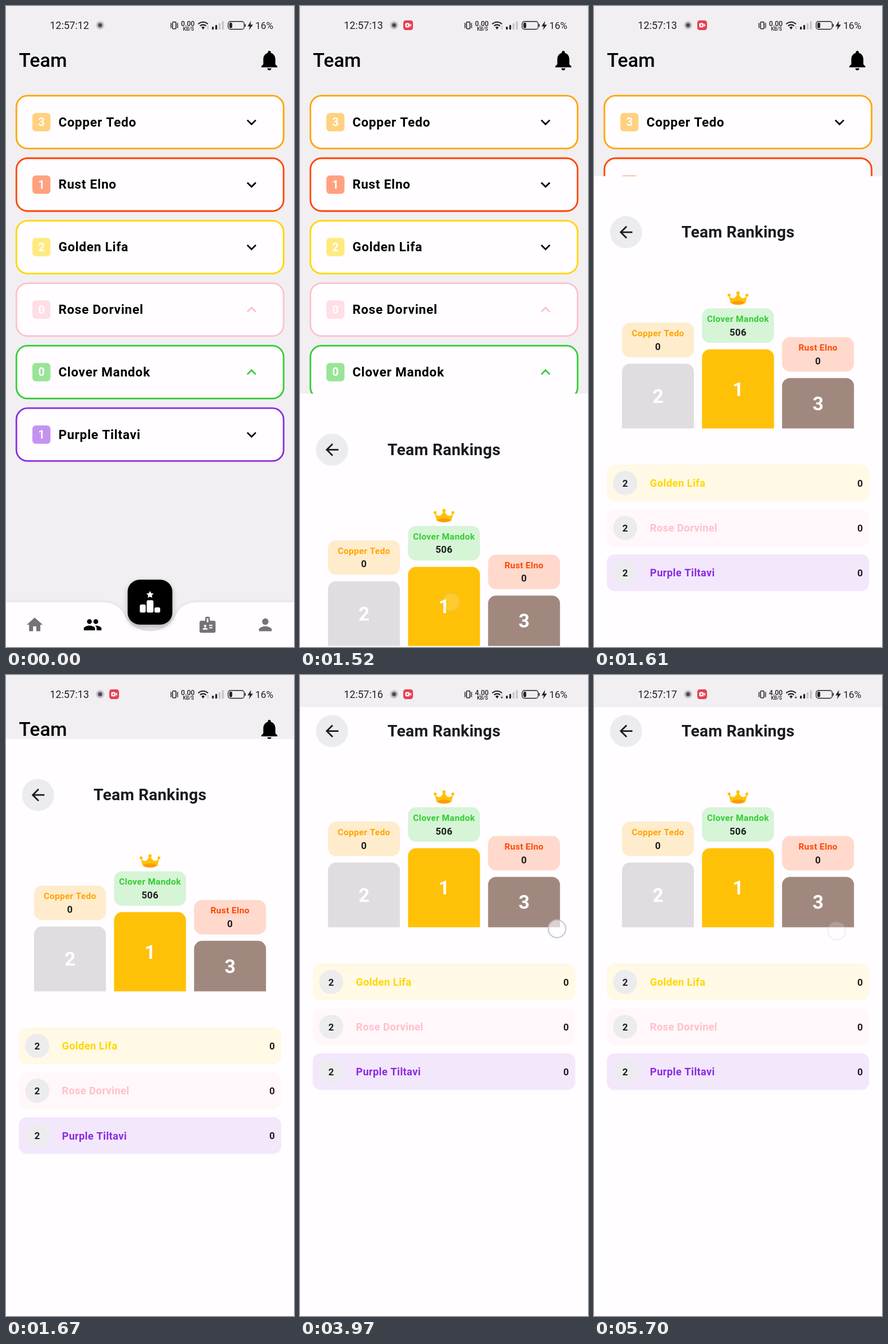
These frames come from a looping animation (502x1116 px, 5.73 s). An HTML page with a canvas:

```html
<!DOCTYPE html>
<html lang="en">
<head>
<meta charset="utf-8">
<title>Team rankings</title>
<style>
html, body { margin: 0; width: 100%; height: 100%; overflow: hidden; background: #f1eff2; }
canvas { display: block; width: 502px; height: 1116px; }
</style>
</head>
<body>
<canvas id="stage"></canvas>
<script>
const W = 502, H = 1116, LOOP = 5730, DP = 1.395;
const canvas = document.getElementById('stage');
const ctx = canvas.getContext('2d');
const ratio = window.devicePixelRatio || 1;
canvas.width = Math.round(W * ratio);
canvas.height = Math.round(H * ratio);

const BG = '#f1eff2', PAPER = '#fffdff', INK = '#1c1b1f', GREY = '#757377', DISC = '#ecebee';

const teams = [
  { name: 'Copper Tedo', rgb: '255,165,0', count: 3 },
  { name: 'Rust Elno', rgb: '255,69,0', count: 1 },
  { name: 'Golden Lifa', rgb: '255,215,0', count: 2 },
  { name: 'Rose Dorvinel', rgb: '255,192,203', count: 0, open: true },
  { name: 'Clover Mandok', rgb: '50,205,50', count: 0, open: true },
  { name: 'Purple Tiltavi', rgb: '138,43,226', count: 1 }
];
const podium = [
  { team: teams[0], x: 48.8, top: 255.3, place: 2, score: 0, fill: '#dfdde0' },
  { team: teams[4], x: 188.3, top: 230.3, place: 1, score: 506, fill: '#ffc107' },
  { team: teams[1], x: 327.8, top: 280.3, place: 3, score: 0, fill: '#a1887f' }
];
const taps = [
  { x: 263, y: 1038, at: 1300, fade: 290 },
  { x: 448, y: 442, at: 3970, fade: 450 },
  { x: 423, y: 446, at: 4640, fade: 450 },
  { x: 423, y: 446, at: 5240, fade: 650 }
];

const icons = {
  bell: 'M12 22c1.1 0 2-.9 2-2h-4c0 1.1.89 2 2 2zm6-6v-5c0-3.07-1.64-5.64-4.5-6.32V4c0-.83-.67-1.5-1.5-1.5s-1.5.67-1.5 1.5v.68C7.63 5.36 6 7.92 6 11v5l-2 2v1h16v-1l-2-2z',
  down: 'M16.59 8.59 12 13.17 7.41 8.59 6 10l6 6 6-6z',
  up: 'M12 8l-6 6 1.41 1.41L12 10.83l4.59 4.58L18 14z',
  back: 'M20 11H7.83l5.59-5.59L12 4l-8 8 8 8 1.41-1.41L7.83 13H20z',
  home: 'M10 20v-6h4v6h5v-8h3L12 3 2 12h3v8z',
  people: 'M16 11c1.66 0 2.99-1.34 2.99-3S17.66 5 16 5c-1.66 0-3 1.34-3 3s1.34 3 3 3zm-8 0c1.66 0 2.99-1.34 2.99-3S9.66 5 8 5C6.34 5 5 6.34 5 8s1.34 3 3 3zm0 2c-2.33 0-7 1.17-7 3.5V19h14v-2.5c0-2.33-4.67-3.5-7-3.5zm8 0c-.29 0-.62.02-.97.05 1.16.84 1.97 1.97 1.97 3.45V19h6v-2.5c0-2.33-4.67-3.5-7-3.5z',
  card: 'M20 7h-5V4c0-1.1-.9-2-2-2h-2c-1.1 0-2 .9-2 2v3H4c-1.1 0-2 .9-2 2v11c0 1.1.9 2 2 2h16c1.1 0 2-.9 2-2V9c0-1.1-.9-2-2-2zM9 12c.83 0 1.5.67 1.5 1.5S9.83 15 9 15s-1.5-.67-1.5-1.5S8.17 12 9 12zm3 6H6v-.75c0-1 2-1.5 3-1.5s3 .5 3 1.5zm1-9h-2V4h2zm5 7.5h-4V15h4zm0-3h-4V12h4z',
  person: 'M12 12c2.21 0 4-1.79 4-4s-1.79-4-4-4-4 1.79-4 4 1.79 4 4 4zm0 2c-2.67 0-8 1.34-8 4v2h16v-2c0-2.66-5.33-4-8-4z'
};
for (const key in icons) icons[key] = new Path2D(icons[key]);

const bolt = new Path2D('M427 26L421 35.5H425L423.5 42L430.5 32.5H426.3Z');
const nav = new Path2D('M0 1038H168Q197 1038 207 1062A50 50 0 0 0 295 1062Q305 1038 334 1038H502V1116H0Z');
const crown = new Path2D('M235 208Q240 214 244.5 212Q248 210 250.5 204H251.5Q254 210 257.5 212Q262 214 267 208L264 221Q251 227.5 238 221Z');

const clamp = v => Math.max(0, Math.min(1, v));
const tint = (team, a) => `rgba(${team.rgb},${a})`;

function easeInOut(x) {
  if (x <= 0 || x >= 1) return clamp(x);
  let lo = 0, hi = 1;
  for (let i = 0; i < 24; i++) {
    const s = (lo + hi) / 2, r = 1 - s;
    const px = 3 * r * r * s * 0.42 + 3 * r * s * s * 0.58 + s * s * s;
    if (px < x) lo = s; else hi = s;
  }
  return lo * lo * (3 - 2 * lo);
}

function box(x, y, w, h, r, fill) {
  ctx.beginPath();
  ctx.roundRect(x, y, w, h, r);
  if (fill) { ctx.fillStyle = fill; ctx.fill(); }
}

function disc(x, y, r, fill) {
  ctx.beginPath();
  ctx.arc(x, y, r, 0, Math.PI * 2);
  ctx.fillStyle = fill;
  ctx.fill();
}

function text(str, x, y, size, color, { weight = 700, align = 'left', gap = 0 } = {}) {
  ctx.font = `${weight} ${size}px Roboto, sans-serif`;
  ctx.letterSpacing = gap + 'px';
  ctx.textAlign = align;
  ctx.fillStyle = color;
  ctx.fillText(str, x, y);
}

function icon(name, cx, cy, color, scale = DP) {
  ctx.save();
  ctx.translate(cx - 12 * scale, cy - 12 * scale);
  ctx.scale(scale, scale);
  ctx.fillStyle = color;
  ctx.fill(icons[name], 'evenodd');
  ctx.restore();
}

function poly(points, fill) {
  ctx.beginPath();
  points.forEach(([x, y]) => ctx.lineTo(x, y));
  ctx.closePath();
  ctx.fillStyle = fill;
  ctx.fill();
}

function shadow(color, blur, dy) {
  ctx.shadowColor = color;
  ctx.shadowBlur = blur * ratio;
  ctx.shadowOffsetY = dy * ratio;
}

function teamCard(team, i) {
  const y = 202.2 + 108.8 * i;
  box(18.1, y - 46, 465.8, 92, 19.5, PAPER);
  ctx.strokeStyle = tint(team, 1);
  ctx.lineWidth = 2 * DP;
  ctx.stroke();
  box(46, y - 16, 31.5, 32, 6, tint(team, 0.5));
  text(team.count, 61.8, y + 7, 19.5, PAPER, { align: 'center' });
  text(team.name, 91.5, y + 7.3, 22.3, '#000', { gap: 0.7 });
  icon(team.open ? 'up' : 'down', 428, y + 0.2, team.open ? tint(team, 1) : '#000');
}

function star(cx, cy, r) {
  const pts = [];
  for (let i = 0; i < 10; i++) {
    const a = -Math.PI / 2 + i * Math.PI / 5, d = i % 2 ? r * 0.52 : r;
    pts.push([cx + d * Math.cos(a), cy + d * Math.sin(a)]);
  }
  poly(pts, '#fff');
}

function teamPage() {
  text('Team', 22.5, 106, 33.4, '#000', { weight: 500 });
  icon('bell', 459, 94.6, '#000', 1.75);
  teams.forEach(teamCard);

  ctx.save();
  shadow('rgba(0,0,0,0.10)', 7, 0);
  ctx.fillStyle = PAPER;
  ctx.fill(nav);
  ctx.restore();
  icon('home', 50, 1077.3, GREY);
  icon('people', 151, 1077.3, '#000');
  icon('card', 351.3, 1077.3, GREY);
  icon('person', 452, 1077.3, GREY);

  ctx.save();
  shadow('rgba(0,0,0,0.27)', 10, 4);
  box(212, 998.8, 78, 78.1, 20.9, '#000');
  ctx.restore();
  star(251, 1025, 6.6);
  box(233.3, 1042, 10.2, 14, 2.5, '#fff');
  box(245.3, 1034.5, 11.7, 21.5, 2.5, '#fff');
  box(258.7, 1047, 10, 9, 2.5, '#fff');
}

function drawCrown() {
  ctx.fillStyle = '#ffc107';
  ctx.fill(crown);
  disc(251, 203.5, 2.9, '#ffc107');
  disc(235.5, 207, 2.6, '#ffc107');
  disc(266.5, 207, 2.6, '#ffc107');
  ctx.beginPath();
  ctx.ellipse(251, 220.3, 11, 3.3, 0, 0, Math.PI * 2);
  ctx.fillStyle = '#fb9b0b';
  ctx.fill();
}

function rankingsPage(top) {
  ctx.save();
  ctx.translate(0, top);
  ctx.fillStyle = PAPER;
  ctx.fillRect(0, 0, W, H);
  disc(55.8, 97.6, 28, DISC);
  icon('back', 55.8, 97.6, INK);
  text('Team Rankings', 251, 107, 27.9, INK, { align: 'center', gap: 0.25 });
  drawCrown();

  podium.forEach(p => {
    const mid = p.x + 62.7, barTop = p.top + 71.2;
    box(p.x, p.top, 125.4, 60, 14, tint(p.team, 0.2));
    text(p.team.name, mid, p.top + 23.7, 15.3, tint(p.team, 1), { align: 'center', gap: 0.35 });
    text(p.score, mid, p.top + 47.2, 16.7, INK, { align: 'center', gap: 0.2 });
    box(p.x, barTop, 125.4, 439.3 - barTop, [14, 14, 0, 0], p.fill);
    text(p.place, mid, (barTop + 439.3) / 2 + 11.9, 33.5, '#fff', { align: 'center' });
  });

  [teams[2], teams[3], teams[5]].forEach((team, i) => {
    const y = 502.3 + 78.1 * i;
    box(22.3, y, 457.5, 64, 14, tint(team, 0.1));
    disc(54.4, y + 32, 21, DISC);
    text('2', 54.4, y + 38.2, 16.7, INK, { align: 'center' });
    text(team.name, 97.6, y + 38.7, 18.1, tint(team, 1), { gap: 0.35 });
    text('0', 468.5, y + 38.2, 16.7, INK, { align: 'right' });
  });
  ctx.restore();
}

function recordBadge(p) {
  if (p <= 0) return;
  ctx.save();
  ctx.globalAlpha = p;
  ctx.translate(188.5, 33.5);
  ctx.scale(0.5 + p / 2, 0.5 + p / 2);
  box(-8.5, -8.5, 17, 17, 4.5, '#ea3f52');
  box(-5, -3.8, 7.4, 7.6, 1.6, '#fff');
  poly([[2.6, -0.6], [5.2, -3], [5.2, 3], [2.6, 0.6]], '#fff');
  disc(-1.3, 0, 1.4, '#ea3f52');
  ctx.restore();
}

function statusBar(t) {
  const dark = '#222124', pale = '#c4c2c6';
  ctx.fillStyle = BG;
  ctx.fillRect(0, 0, W, 56);
  const second = 12 + Math.floor((t + 30) / 1000);
  text('12:57:' + second, 76.5, 40, 17.7, dark, { weight: 400 });

  disc(164, 33.5, 7.5, '#cfcdd1');
  disc(164, 33.5, 5, '#a3a1a5');
  disc(164, 33.5, 3.2, '#4b494d');
  recordBadge(clamp((t - 640) / 270));

  ctx.strokeStyle = dark;
  ctx.lineWidth = 1.6;
  box(290.3, 27.8, 6, 12, 1.6);
  ctx.stroke();
  ctx.lineWidth = 1.3;
  ctx.beginPath();
  [[287, 1], [299.6, -1]].forEach(([x, d]) => {
    ctx.moveTo(x, 29.5);
    ctx.lineTo(x + d, 32);
    ctx.lineTo(x, 34);
    ctx.lineTo(x + d, 36);
    ctx.lineTo(x, 38.5);
  });
  ctx.stroke();

  text((t < 2270 ? '0' : '4') + '.00', 317, 35, 12, dark, { weight: 500, align: 'center' });
  text('KB/S', 318, 42.5, 8.4, dark, { weight: 500, align: 'center' });

  ctx.lineWidth = 2.2;
  [7.4, 12].forEach(r => {
    ctx.beginPath();
    ctx.arc(343.5, 40, r, -Math.PI * 0.75, -Math.PI * 0.25);
    ctx.stroke();
  });
  ctx.beginPath();
  ctx.moveTo(343.5, 41);
  ctx.arc(343.5, 40, 4, -Math.PI * 0.75, -Math.PI * 0.25);
  ctx.fillStyle = dark;
  ctx.fill();
  poly([[349.5, 37], [354, 37], [351.8, 34.4]], pale);
  poly([[349.5, 38.2], [354, 38.2], [351.8, 41]], t < 3480 ? pale : dark);

  [5, 8, 11, 14.5].forEach((h, i) => {
    box(359 + i * 5.8, 41 - h, 3.2, h, 1, i < 2 ? dark : pale);
  });

  ctx.lineWidth = 1.3;
  box(387.2, 27, 28, 13.5, 4);
  ctx.stroke();
  box(389.3, 29, 5, 9.5, 2, dark);
  box(416.2, 31.2, 1.6, 5, 0.8, dark);
  ctx.fillStyle = dark;
  ctx.fill(bolt);
  text('16%', 434.5, 39.8, 17, dark, { weight: 400 });
}

function drawTap({ x, y, at, fade }, t) {
  if (t < at || t >= at + fade) return;
  ctx.save();
  ctx.globalAlpha = 1 - (t - at) / fade;
  disc(x, y, 15, 'rgba(255,253,255,0.62)');
  ctx.beginPath();
  ctx.arc(x, y, 15.3, 0, Math.PI * 2);
  ctx.strokeStyle = 'rgba(190,193,208,0.85)';
  ctx.lineWidth = 2.2;
  ctx.stroke();
  ctx.restore();
}

function draw(t) {
  ctx.setTransform(ratio, 0, 0, ratio, 0, 0);
  ctx.fillStyle = BG;
  ctx.fillRect(0, 0, W, H);

  // The sheet rises in 30 ms steps.
  const step = Math.floor((t - 20) / 30) * 30 + 20;
  const shown = easeInOut((step - 1327) / 440);
  if (shown < 1) teamPage();
  if (shown > 0) rankingsPage(H * (1 - shown));
  statusBar(t);
  taps.forEach(tap => drawTap(tap, t));
}

const start = performance.now();
function tick() {
  draw((performance.now() - start) % LOOP);
  requestAnimationFrame(tick);
}
tick();
</script>
</body>
</html>
```
